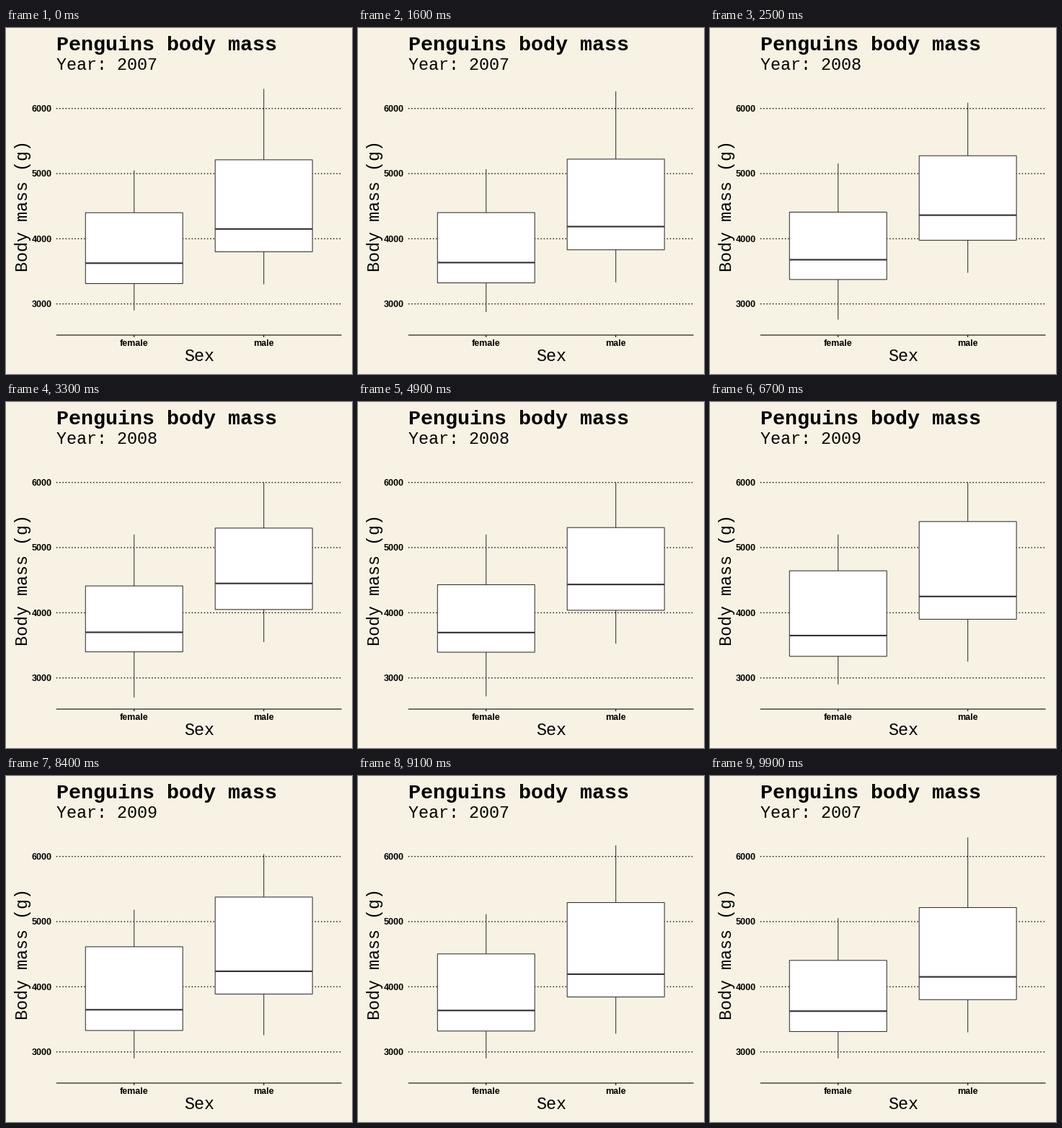
A matplotlib script for the animation above (10000 ms loop, 480 by 480 pixels).

```python
import matplotlib.pyplot as plt
import numpy as np
from matplotlib.animation import FuncAnimation
from matplotlib.patches import Rectangle

SIZE, DPI = 480, 72          # at 72 dpi one point is one pixel
FRAMES, INTERVAL = 100, 100
HOLD, MOVE = 12, 22          # frames a year rests, then glides to the next
PAPER, INK, GREY = "#f8f2e4", "black", "#333333"
LEFT, RIGHT, BOTTOM = 69.8, 465.6, 426.0
MIDDLE = (LEFT + RIGHT) / 2
THIN = 1.07
UNIT = (RIGHT - LEFT) / 2.2  # width of one category
SEXES = ("female", "male")
CENTERS = LEFT + UNIT * np.array([0.6, 1.6])
HALF = 0.375 * UNIT

# min, q1, median, q3, max in grams, female then male, for each year
YEARS = (2007, 2008, 2009)
STATS = np.array([
    [[2900, 3312, 3625, 4400, 5050], [3300, 3800, 4150, 5212, 6300]],
    [[2700, 3400, 3700, 4412, 5200], [3550, 4050, 4450, 5300, 6000]],
    [[2900, 3331, 3650, 4644, 5200], [3250, 3900, 4250, 5400, 6000]],
])


def y_of(mass):
    return 111.65 + (6000 - mass) * 0.09036


def state(frame):
    """Year label and box statistics shown at a frame."""
    leg, step = divmod(max(frame - HOLD + 1, 0), HOLD + MOVE)
    old, new = leg % 3, (leg + 1) % 3
    ease = (1 - np.cos(np.pi * min(step / MOVE, 1))) / 2
    year = YEARS[new if step > MOVE / 2 else old]
    return year, STATS[old] + ease * (STATS[new] - STATS[old])


fig = plt.figure(figsize=(SIZE / DPI, SIZE / DPI), dpi=DPI, facecolor=PAPER)
ax = fig.add_axes([0, 0, 1, 1])
ax.set_xlim(0, SIZE)
ax.set_ylim(SIZE, 0)
ax.axis("off")


def line(xs, ys, color=INK, width=THIN, z=1, **kw):
    return ax.plot(xs, ys, color=color, lw=width, zorder=z, snap=False,
                   solid_capstyle="butt", dash_capstyle="butt", **kw)[0]


def mono(x, y, text, size=23.33, va="baseline", **kw):
    return ax.text(x, y, text, family="Liberation Mono", size=size,
                   color=INK, va=va, **kw)


def label(x, y, text, ha):
    ax.text(x, y, text, family="Liberation Sans", weight="bold", size=12.5,
            color=INK, va="baseline", ha=ha)


mono(LEFT, 31, "Penguins body mass", 28.33, weight="bold")
subtitle = mono(LEFT, 58, "")
mono(MIDDLE, 462, "Sex", ha="center")
mono(23.5, 247.5, "Body mass (g)", va="center", ha="center", rotation=90)

for mass in range(3000, 6001, 1000):
    y = y_of(mass)
    line([LEFT, RIGHT], [y, y], width=1.4, linestyle=(0, (1, 2.05)))
    label(64, y + 4.2, str(mass), "right")

line([LEFT, RIGHT], [BOTTOM, BOTTOM])
for x, sex in zip(CENTERS, SEXES):
    line([x, x], [BOTTOM, BOTTOM + 3])
    label(x, 441, sex, "center")

boxes = []
for x in CENTERS:
    lower = line([x, x], [0, 0], GREY, z=2)
    upper = line([x, x], [0, 0], GREY, z=2)
    box = ax.add_patch(Rectangle((x - HALF, 0), 2 * HALF, 0, fc="white",
                                 ec=GREY, lw=THIN, zorder=3, snap=False))
    median = line([x - HALF, x + HALF], [0, 0], GREY, 2 * THIN, z=4)
    boxes.append((lower, upper, box, median))


def draw(frame):
    year, stats = state(frame)
    subtitle.set_text(f"Year: {year}")
    for (lower, upper, box, median), row in zip(boxes, y_of(stats)):
        low, q1, mid, q3, top = row
        lower.set_ydata([low, q1])
        upper.set_ydata([q3, top])
        box.set_y(q3)
        box.set_height(q1 - q3)
        median.set_ydata([mid, mid])
    return [subtitle, *(part for group in boxes for part in group)]


anim = FuncAnimation(fig, draw, frames=FRAMES, interval=INTERVAL,
                     repeat=True, repeat_delay=0, blit=False)
plt.show()
```
